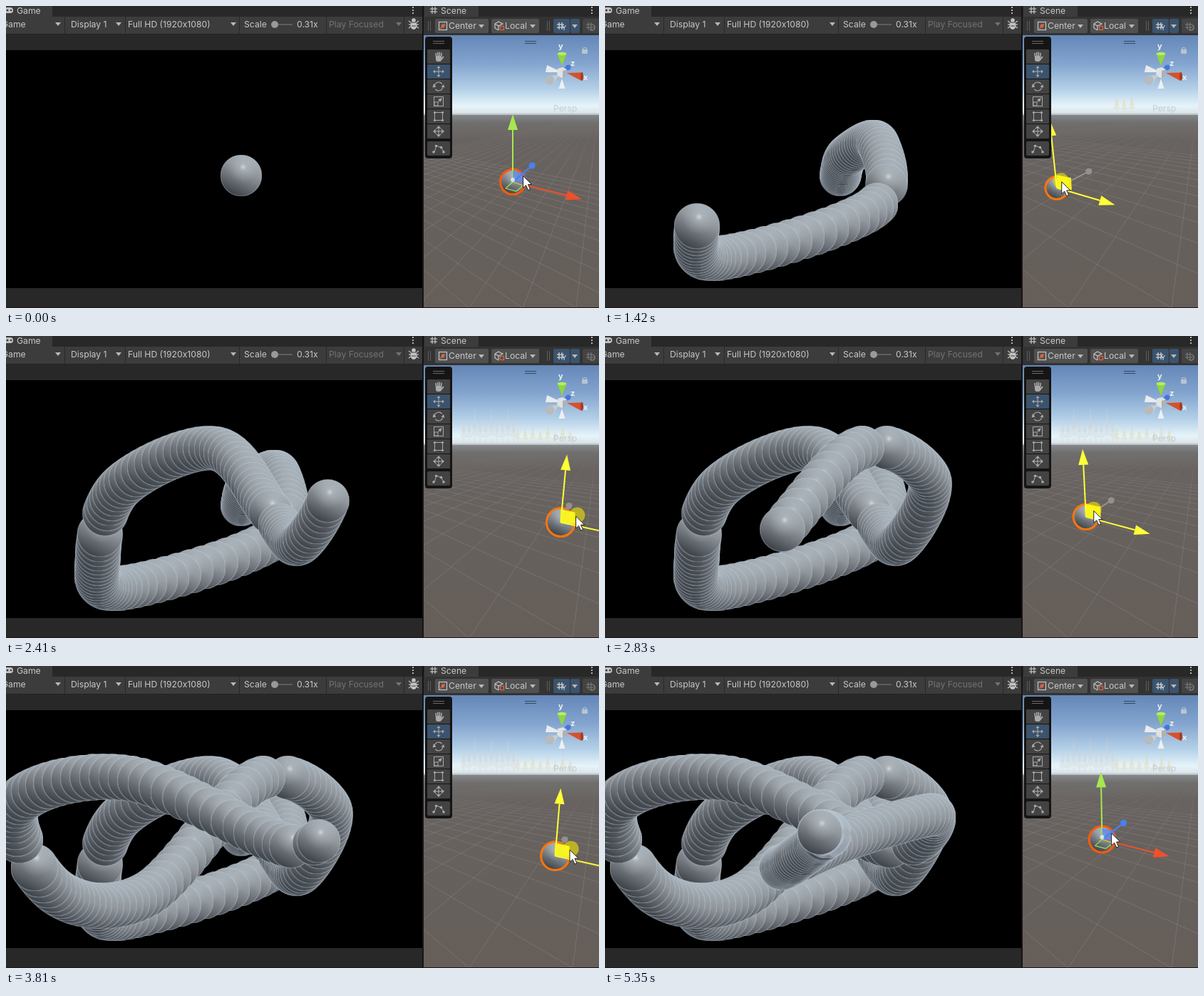
Recreate the animation shown at these times as an HTML page with a canvas. Size 832 by 424 pixels, loop 5.41 s.

```html
<!DOCTYPE html>
<html lang="en">
<head>
<meta charset="utf-8">
<title>Sphere trail</title>
<style>
html, body { margin: 0; width: 100%; height: 100%; overflow: hidden; background: #191919; }
canvas { display: block; }
</style>
</head>
<body>
<canvas id="stage" width="832" height="424"></canvas>
<script>
const c = document.getElementById('stage').getContext('2d');
const LOOP = 5410, START = 450, STEP = 70, LAST = 70;
const TAU = Math.PI * 2;

// the drag passes one key point every three steps
const keys = [
  [330, 238], [341, 209], [383, 193], [375, 284], [160, 354], [129, 309], [163, 210], [295, 158], [371, 247],
  [412, 291], [455, 200], [352, 160], [198, 320], [72, 318], [15, 195], [175, 158], [400, 253],
  [460, 209], [345, 240], [254, 280], [262, 276], [300, 247], [314, 236], [304, 233], [301, 234]
];

// Catmull-Rom spline through the key points
function sphereAt(s) {
  const f = (s + 1) / 3, i = Math.min(Math.floor(f), keys.length - 2), u = f - i;
  const key = n => keys[Math.max(0, Math.min(keys.length - 1, n))];
  const [a, b, d, e] = [key(i - 1), key(i), key(i + 1), key(i + 2)];
  const at = k => b[k] + u / 2 * (d[k] - a[k]
    + u * (2 * a[k] - 5 * b[k] + 4 * d[k] - e[k] + u * (3 * (b[k] - d[k]) + e[k] - a[k])));
  const x = at(0), y = at(1);
  return { s, x, y, r: 29 + (330 - x) * 0.007 + 2.3 * (1 - Math.exp(-(s + 1) / 12)) };
}

// five stamps per step, with a short hitch every eight steps
const stamps = [];
for (let k = -5; k <= LAST * 5; k++) {
  const s = k / 5, phase = s % 8;
  if (phase < 7.1 || phase > 7.7) stamps.push(sphereAt(s));
}

// drawing helpers
function rect(x, y, w, h, fill) { c.fillStyle = fill; c.fillRect(x, y, w, h); }
function round(x, y, w, h, r, fill) {
  c.fillStyle = fill; c.beginPath(); c.roundRect(x, y, w, h, r); c.fill();
}
function box(x, y, w, h, color, width = 1.2) {
  c.strokeStyle = color; c.lineWidth = width; c.strokeRect(x, y, w, h);
}
function trace(p) {
  c.beginPath();
  for (let i = 0; i < p.length; i += 2) c.lineTo(p[i], p[i + 1]);
}
function poly(fill, ...p) { trace(p); c.closePath(); c.fillStyle = fill; c.fill(); }
function line(color, w, ...p) { trace(p); c.strokeStyle = color; c.lineWidth = w; c.stroke(); }
function oval(x, y, rx, ry, fill) { c.fillStyle = fill; c.beginPath(); c.ellipse(x, y, rx, ry, 0, 0, TAU); c.fill(); }
function disc(x, y, r, fill) { oval(x, y, r, r, fill); }
function ring(x, y, r, color, w, a = 0, b = TAU) {
  c.strokeStyle = color; c.lineWidth = w; c.beginPath(); c.arc(x, y, r, a, b); c.stroke();
}
function text(s, x, y, fill = '#c8c8c8', size = 12.2, weight = '') {
  c.font = `${weight} ${size}px Inter, sans-serif`; c.fillStyle = fill; c.fillText(s, x, y);
}
function ramp(g, ...stops) {
  for (let i = 0; i < stops.length; i += 2) g.addColorStop(stops[i], stops[i + 1]);
  return g;
}
function fade(y0, y1, ...stops) { return ramp(c.createLinearGradient(0, y0, 0, y1), ...stops); }
function caret(x, y, fill = '#b8b8b8') { poly(fill, x - 4, y - 2, x + 4, y - 2, x, y + 3); }
function dots(x) { for (let y = 1; y < 10; y += 4) rect(x - 1, y, 2, 2, '#b4b4b4'); }
function cone(x0, y0, x1, y1, w, fill) {
  const d = Math.hypot(x1 - x0, y1 - y0), nx = (y0 - y1) / d * w, ny = (x1 - x0) / d * w;
  poly(fill, x0 + nx, y0 + ny, x1, y1, x0 - nx, y0 - ny);
}
function arrow(x, y, dx, dy, fill) {
  const u = 1 - 22 / Math.hypot(dx, dy);
  line(fill, 2, x, y, x + dx * u, y + dy * u);
  cone(x + dx * u, y + dy * u, x + dx, y + dy, 7, fill);
}

// shaded ball, lit from the upper right
const ball = document.createElement('canvas');
ball.width = ball.height = 128;
{
  const b = ball.getContext('2d');
  b.arc(64, 64, 63.5, 0, TAU);
  b.fillStyle = ramp(b.createLinearGradient(94, 6, 36, 122),
    0, '#a6b0b8', 0.35, '#92989d', 0.65, '#6d7278', 1, '#3c4147');
  b.fill();
  b.fillStyle = ramp(b.createRadialGradient(70, 38, 1, 70, 38, 50),
    0, 'rgba(224,232,234,.75)', 0.2, 'rgba(200,208,212,.4)', 1, 'rgba(180,190,196,0)');
  b.fill();
  b.strokeStyle = 'rgba(190,202,217,.35)'; b.lineWidth = 3;
  b.stroke();
}
function sphere(x, y, r) { c.drawImage(ball, x - r, y - r, r * 2, r * 2); }

function gameView(step) {
  const ink = '#c4c4c4', dim = '#737373';
  rect(0, 0, 585, 424, '#282828');
  rect(0, 0, 65, 15, '#3c3c3c');
  rect(0, 15, 585, 24, '#3c3c3c');
  rect(0, 39, 585, 1, '#232323');
  round(-2, 2, 12, 8, 4, ink);
  disc(2, 6, 1.5, '#3c3c3c'); disc(7, 6, 1.3, '#3c3c3c');
  text('Game', 15, 11);
  text('Game', -6, 30);
  text('Display 1', 91, 30);
  text('Full HD (1920x1080)', 171, 30);
  text('Scale', 334, 30);
  text('0.31x', 408, 30);
  text('Play Focused', 453, 30, dim);
  for (const x of [73, 158, 319]) caret(x, 25);
  caret(551, 25, dim);
  for (const x of [82, 167, 327, 449, 558]) rect(x, 15, 1, 24, '#2a2a2a');
  rect(377, 25, 25, 2, '#5e5e5e');
  disc(377, 26, 5, '#999');
  dots(571);
  for (let y = 21; y < 32; y += 5) line(ink, 1.2, 565, y, 579, 52 - y);
  oval(572, 27, 4.5, 6, ink);
  disc(572, 20, 2.8, ink);
  line('#3c3c3c', 1, 568, 23, 576, 23);
  line('#3c3c3c', 1, 569, 28, 575, 28);

  c.save();
  c.beginPath(); c.rect(0, 62, 584, 334); c.clip();
  rect(0, 62, 584, 334, '#000');
  for (const p of stamps) if (p.s <= step + 0.01) sphere(p.x, p.y, p.r);
  c.restore();
}

function grid(vx, gap) {
  const paint = fade(160, 424, 0, 'rgba(165,165,165,0)', 0.25, 'rgba(165,165,165,.22)', 1, 'rgba(165,165,165,.28)');
  for (let k = -14; k <= 14; k++) line(paint, 1, vx, 152, 650 + k * gap, 424);
}

function tree(x, h, fill) {
  for (let k = 0; k < 3; k++) {
    const top = 148 - h * (1 - k * 0.22);
    poly(fill, x, top, x - 2 - k * 1.5, top + h * 0.4, x + 2 + k * 1.5, top + h * 0.4);
  }
  rect(x - 0.7, 148 - h * 0.2, 1.4, h * 0.2 + 4, fill);
}

function trees(step) {
  const full = step >= 24;
  if (step >= 16) for (let i = 0; i < 10; i += full ? 1 : 2)
    tree(642 + i * 7.8, 24 + 24 * Math.abs(Math.sin(i * 2.1 + 0.5)), 'rgba(205,211,211,.35)');
  if (full || step >= 8 && step < 16) for (let i = 0; i < (full ? 8 : 3); i++)
    tree(718 + i * 10.5, 15 + 9 * Math.abs(Math.sin(i * 1.7 + 1)), 'rgba(226,217,180,.4)');
}

function compass() {
  const x = 780, y = 93;
  cone(758, 88, x, y, 5, '#e8ecee');
  cone(789, 86, x, y, 4, '#4577dc');
  disc(789, 86, 3.5, '#4577dc');
  poly('#dfe3e5', 774, 88, 781, 86, 787, 89, 787, 98, 780, 101, 773, 98);
  poly('#aeb2b5', 781, 91, 787, 89, 787, 98, 781, 101);
  cone(x, 67, x, 84, 6.5, '#8fd63f');
  oval(x, 67, 6.5, 2.2, '#b4ee67');
  cone(808, 99, 787, 94, 6, '#d6512c');
  oval(808, 99, 2, 6, '#a73b20');
  cone(x, 116, x, 102, 4.5, '#eef0f1');
  cone(764, 104, 776, 97, 7, '#c9cdd0');
  disc(763, 104, 6.5, '#b6bbbf');
  text('y', 775, 60, '#eef2f5', 11, 'bold');
  text('x', 810, 104, '#eef2f5', 11, 'bold');
  text('z', 792, 84, '#eef2f5', 11, 'bold');
  round(808, 61, 8, 6, 1, '#b9c4d0');
  ring(812, 61, 2.5, '#b9c4d0', 1.2, Math.PI, TAU);
  text('Persp', 768, 148, 'rgba(188,197,203,.8)');
}

function cursor(x, y) {
  const p = [0, 0, 0, 17, 4, 13.3, 7, 20, 10, 18.7, 7, 12.2, 12, 12, 0, 0];
  c.save(); c.translate(x, y);
  poly('#fff', ...p); line('#222', 1, ...p);
  c.restore();
}

// the same sphere seen from the scene camera
function handle(step) {
  const idle = step < 0 || step >= LAST;
  const p = sphereAt(step), gx = p.x - 330, gy = p.y - 238, near = p.r - 29;
  const d = gx * 0.49 + gx * gx * 0.00053;
  const x = 711 + d, y = 247 + gy * 0.46 + gx * 0.135 + near * 0.9;
  const r = 17.5 + gx * 0.015 + near * 0.5;
  const zx = x + 27 - d * 0.23, zy = y - 23;
  const tint = (color, held = '#ffff35') => idle ? color : held;
  const blue = tint('#4a80ee', '#91918d');

  sphere(x, y, r);
  ring(x, y, r, tint('#ff5a0a', '#ff7608'), 3);
  line(blue, 2, x, y, zx, zy);
  disc(zx, zy, 4.5, blue);
  cone(zx - 1, zy + 1, zx + 5, zy - 4, 3, blue);
  if (!idle) disc(x + 15 + d * 0.12, y - 10, 11, 'rgba(224,211,15,.7)');
  arrow(x, y, d * 0.13, -95, tint('#a6e84f'));
  arrow(x, y, 97 + d * 0.2, 24, tint('#f0502a'));
  if (idle) {
    poly('rgba(75,125,245,.65)', x, y - 16, x + 17, y - 12, x + 18, y + 3, x, y);
    line('#9eea4f', 1.2, x - 10, y + 9, x + 5, y + 13, x + 15, y + 5, x, y, x - 10, y + 9);
    disc(x, y - 3, 3, 'rgba(235,247,250,.75)');
  } else {
    poly('rgba(255,250,25,.92)', x, y - 18, x + 20, y - 14, x + 21, y + 3, x, y);
  }
  cursor(x + 14.5 + d * 0.1, y - 8.5);
}

function cross(x, y, n, ink) {
  for (let k = 0; k < 4; k++) {
    const u = Math.round(Math.cos(k * TAU / 4)), v = Math.round(Math.sin(k * TAU / 4));
    line(ink, 1.1, x, y, x + u * n, y + v * n);
    cone(x + u * (n - 2), y + v * (n - 2), x + u * (n + 1), y + v * (n + 1), 2.6, ink);
  }
}

function tools() {
  const ink = '#a9a9a9', x = 607;
  round(588, 43, 38, 171, 4, '#151515');
  for (const y of [49.5, 52.5]) line('#686868', 1, 599, y, 615, y);
  for (let i = 0; i < 6; i++) round(591, 61 + i * 21, 32, 20, 1, i === 1 ? '#3b536d' : '#434343');
  round(591, 190, 32, 20, 2, '#434343');

  // hand
  round(x - 4, 70, 8, 8, 3, ink);
  for (let i = 0; i < 4; i++) line(ink, 1.6, x - 3.2 + i * 2.2, 73, x - 4 + i * 2.7, 66 - Math.sin(i) * 1.5);
  line(ink, 2, x + 3, 76, x + 7, 71);

  cross(x, 92, 7, ink);

  // rotate
  for (const s of [1, -1]) {
    const a = s > 0 ? 0.2 : 3.34;
    ring(x, 113, 6, ink, 1.1, a, a + 2.3);
    cone(x + s * 6, 114, x + s * 7, 109.5 + s * 0.5, 2.5, ink);
  }

  // scale
  box(600.5, 127.5, 13, 13, ink, 1);
  box(601, 135, 5, 5, ink, 1);
  line(ink, 1, 606, 135, 610, 131); cone(608, 133, 612, 129, 2.6, ink);

  // rectangle
  box(601.5, 149.5, 11, 11, ink, 1);
  for (const sx of [601.5, 612.5]) for (const y of [149.5, 160.5]) disc(sx, y, 1.6, ink);

  ring(x, 176, 5, ink, 1); cross(x, 176, 7, ink);

  // path
  line(ink, 1, 601, 205, 604, 196, 611, 199, 614, 205);
  for (const s of [-1, 1]) { disc(x + s * 7, 205, 1.8, ink); disc(x + s * 3.5, 197.5 + s, 1.8, ink); }
}

function hash(x, y, color) {
  for (const k of [3, 7]) {
    line(color, 1.2, x + k, y, x + k, y + 10);
    line(color, 1.2, x, y + k, x + 10, y + k);
  }
}

function sceneBar() {
  const ink = '#c4c4c4', orange = '#e1623a', on = '#3b536d';
  rect(586, 0, 246, 15, '#282828');
  rect(587, 0, 76, 15, '#3c3c3c');
  rect(586, 15, 246, 26, '#333');
  hash(595, 1, ink);
  text('Scene', 610, 11);
  dots(822);
  for (const x of [592.5, 595.5, 759.5, 762.5]) line('#5d5d5d', 1, x, 21, x, 35);
  round(602, 18, 75, 20, 2, '#505050');
  round(681, 18, 67, 20, 2, '#505050');
  round(768, 18, 23, 20, 2, on);
  round(792, 18, 13, 20, 2, on);
  round(809, 18, 30, 20, 2, '#434343');
  box(607.5, 22.5, 11, 11, ink);
  line(orange, 1.5, 609, 32, 616, 25); disc(613, 28, 2.4, orange);
  text('Center', 621, 32); caret(667, 28);
  line(ink, 1.2, 691, 34, 686, 31, 686, 25, 691, 22, 697, 25, 691, 28, 686, 25);
  line(ink, 1.2, 691, 28, 691, 34);
  box(693.5, 28.5, 5, 5, orange);
  text('Local', 700, 32); caret(739, 28);
  hash(773, 23, '#d8d8d8'); text('Y', 780, 34, '#eee', 9); caret(798, 28);
  hash(814, 23, '#777'); ring(822, 30, 4, '#777', 1.8, -1, 2.4);
}

function sceneView(step) {
  rect(584, 0, 2, 424, '#191314');
  sceneBar();
  c.save();
  c.beginPath(); c.rect(586, 41, 246, 382); c.clip();
  rect(586, 41, 246, 113, fade(41, 154, 0, '#6487b8', 0.35, '#83a4ce', 0.67, '#b4d0e8', 0.88, '#e6f4f9', 0.96, '#dce6ea', 1, '#a4aaaf'));
  rect(586, 153, 246, 270, fade(153, 423, 0, '#85878a', 0.04, '#706f6e', 0.13, '#686360', 1, '#655e59'));
  const gap = step < 0 ? 75 : 145;
  grid(330, gap);
  grid(830, gap);
  trees(step);
  compass();
  for (const y of [49.5, 52.5]) line('#32485f', 1, 728, y, 744, y);
  handle(step);
  tools();
  c.restore();
  rect(0, 423, 832, 1, '#211718');
}

function draw(now) {
  const t = now % LOOP;
  const step = t < START ? -1 : Math.min(LAST, Math.floor((t - START + 10) / STEP));
  gameView(step);
  sceneView(step);
  requestAnimationFrame(draw);
}
requestAnimationFrame(draw);
</script>
</body>
</html>
```
